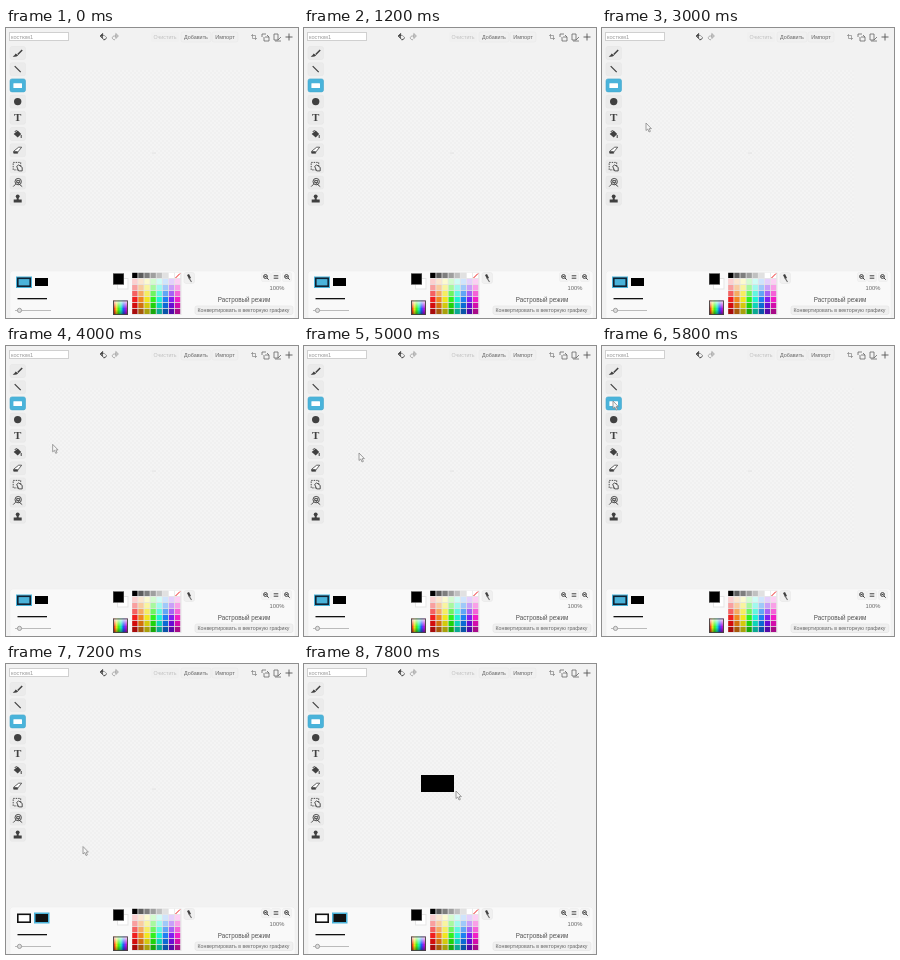
Recreate the animation shown at these times as an HTML page with a canvas. Size 292x290 px, loop 8000 ms.

```html
<!DOCTYPE html>
<html lang="ru">
<head>
<meta charset="utf-8">
<style>
html, body { margin: 0; width: 100%; height: 100%; overflow: hidden; background: #f2f2f2; }
canvas { display: block; width: 292px; height: 290px; }
</style>
</head>
<body>
<canvas width="292" height="290"></canvas>
<script>
const canvas = document.querySelector('canvas');
const g = canvas.getContext('2d');
const LOOP = 8000, STEP = 200;
const INK = '#404040', TEXT = '#666', BLUE = '#4ab3da';

// Pointer path: time, x, y
const POINTER = [
  [2600, 24, 87], [3000, 44, 95], [3600, 44, 95], [4200, 48, 100],
  [4600, 48, 100], [5000, 55, 107], [5600, 11, 55], [6000, 11, 55],
  [6600, 37, 254], [7000, 37, 254], [7400, 117, 111], [7800, 152, 127]
];
const DRAW_START = 7400, PICK = 6800;
const ORIGIN = [117, 111];

function box(x, y, w, h, fill, stroke, width = 1) {
  if (fill) { g.fillStyle = fill; g.fillRect(x, y, w, h); }
  if (stroke) {
    g.strokeStyle = stroke;
    g.lineWidth = width;
    g.strokeRect(x + width / 2, y + width / 2, w - width, h - width);
  }
}

function round(x, y, w, h, r, fill, stroke) {
  g.beginPath();
  g.roundRect(x, y, w, h, r);
  g.fillStyle = fill;
  g.fill();
  if (stroke) { g.strokeStyle = stroke; g.lineWidth = 0.6; g.stroke(); }
}

function shape(x, y, d, fill, stroke, width = 1) {
  const p = new Path2D(d);
  g.save();
  g.translate(x, y);
  if (fill) { g.fillStyle = fill; g.fill(p); }
  if (stroke) { g.strokeStyle = stroke; g.lineWidth = width; g.stroke(p); }
  g.restore();
}

function disc(x, y, r, fill, stroke, width = 1) {
  g.beginPath();
  g.arc(x, y, r, 0, Math.PI * 2);
  if (fill) { g.fillStyle = fill; g.fill(); }
  if (stroke) { g.strokeStyle = stroke; g.lineWidth = width; g.stroke(); }
}

function label(s, x, y, size, color, align = 'center') {
  g.font = size + 'px "Liberation Sans", Arial, sans-serif';
  g.textAlign = align;
  g.fillStyle = color;
  g.fillText(s, x, y);
}

function checker() {
  const tile = document.createElement('canvas');
  tile.width = tile.height = 4;
  const c = tile.getContext('2d');
  c.fillStyle = '#f4f4f4';
  c.fillRect(0, 0, 4, 4);
  c.fillStyle = '#f0f0f0';
  c.fillRect(0, 0, 2, 2);
  c.fillRect(2, 2, 2, 2);
  return g.createPattern(tile, 'repeat');
}
const grid = checker();

function topBar() {
  box(3, 4, 60, 9, '#fff', '#d0d0d0');
  label('костюм1', 5, 10.8, 5.6, '#999', 'left');
  const arrow = 'M-2.5 -1H0.5C3.5 -1 3.5 2.8 0 2.8M-0.8 -3.5L-3.4 -1L-0.8 1.5Z';
  shape(97.5, 9, arrow, '#444', '#444', 0.9);
  shape(97.8, 9, 'M-1 -1H0.5C3 -1 3 2.2 -0.5 2.2Z', '#f2f2f2');
  g.save();
  g.translate(109, 9);
  g.scale(-1, 1);
  shape(0, 0, arrow, null, '#999', 0.8);
  g.restore();

  round(145, 4, 28, 10, 2, '#f0f0f0');
  round(175, 4, 30, 10, 2, '#f0f0f0', '#e8e8e8');
  round(206, 4, 26, 10, 2, '#f0f0f0', '#e8e8e8');
  label('Очистить', 159, 10.8, 5.3, '#c0c0c0');
  label('Добавить', 190, 10.8, 5.4, TEXT);
  label('Импорт', 219, 10.8, 5.6, TEXT);

  shape(248, 9, 'M-1.5 -3V1.5H3M-3 -1.5H1.5V3', null, '#888', 0.7);
  shape(260, 9, 'M-4 0V-3H0M-1 0H3V4H-2V0M1 -2L3 0', null, '#666', 0.8);
  shape(271, 9, 'M-3 -3H1V3H-3ZM-2 4H4M1 3L4 0', null, '#666', 0.8);
  shape(283, 9, 'M-3.5 0H3.5M0 -3.5V3.5', null, '#555', 0.9);
}

const TOOLS = [
  (x, y) => {
    shape(x, y, 'M4.5 -3L0 1.5', null, INK, 1.5);
    shape(x, y, 'M-5 3.5Q-3 2.5 -2 0.5L0.5 2.5Q-2 4.5 -5 3.5Z', INK);
  },
  (x, y) => shape(x, y, 'M-3 -3L3 3', null, INK, 1.2),
  (x, y) => round(x - 4.3, y - 2.2, 8.6, 4.8, 0.5, '#fff'),
  (x, y) => disc(x, y, 3.7, INK),
  (x, y) => {
    g.font = 'bold 11px "Liberation Serif", serif';
    g.textAlign = 'center';
    g.fillStyle = INK;
    g.fillText('T', x, y + 3.6);
  },
  (x, y) => {
    shape(x, y, 'M-4 0L0 -3.5L3.5 0L0 3.5Z', INK);
    shape(x, y, 'M-1 -4L-3 -2M3.5 1V4', null, INK, 1);
  },
  (x, y) => {
    shape(x, y, 'M-4 1L1 -3H4L0 2V3H-4Z', '#fff', INK, 0.8);
    shape(x, y, 'M-4 1H0V3H-4Z', INK);
  },
  (x, y) => {
    g.setLineDash([1.5, 1]);
    shape(x, y, 'M-4.5 -4H3V3.5H-4.5Z', null, INK, 0.9);
    g.setLineDash([]);
    shape(x, y, 'M-1 0L1 -1.5L4.5 1V4.5H1Z', '#eee', INK, 0.9);
  },
  (x, y) => {
    disc(x + 0.5, y - 1, 3.2, '#e4e4e4', INK, 0.9);
    shape(x, y, 'M-4.5 4L-2 1.5M0 0.5L4.5 4M-1 -2H2V0H-1Z', null, INK, 0.9);
  },
  (x, y) => {
    disc(x, y - 2.5, 1.9, INK);
    shape(x, y, 'M-1 -2H1V0.8H4V3.8H-4V0.8H-1Z', INK);
  }
];

function toolBar() {
  TOOLS.forEach((icon, i) => {
    const y = 25 + i * 16.2;
    const on = i === 2;
    round(4, y - 6.5, 15.5, 13, 2, on ? BLUE : '#ebebeb', on ? '#43a6cc' : '#e6e6e6');
    icon(11.7, y);
  });
}

function fillModes(solid) {
  if (solid) {
    box(11, 249.5, 14, 9.5, '#fff', '#111', 1.6);
    box(28, 248.5, 15.5, 11, BLUE);
    box(29.5, 250, 12.5, 8, '#111');
  } else {
    box(10, 248.5, 16, 11.5, BLUE);
    box(11, 249.5, 14, 9.5, BLUE, '#123', 1.6);
    box(29, 250, 13, 8, '#000');
  }
  box(11.5, 270, 29.5, 1.3, '#111');
  box(9, 282, 36, 1, '#bbb');
  disc(13.5, 282.4, 2.1, '#ddd', '#999', 0.9);
}

function palette() {
  const hues = [0, 30, 57, 115, 172, 212, 268, 312];
  const lightness = [90, 80, 67, 53, 44, 35];
  const w = 6.1, h = 6;
  box(126, 244.5, 49.5, 42.5, '#e6e6e6');
  for (let c = 0; c < 8; c++) {
    const grey = c ? Math.min(255, 60 + c * 33) : 0;
    const x = 126.2 + c * w;
    box(x, 244.8, w - 0.8, h - 0.8, `rgb(${grey},${grey},${grey})`);
    lightness.forEach((l, r) =>
      box(x, 244.8 + (r + 1) * h, w - 0.8, h - 0.8, `hsl(${hues[c]},88%,${l}%)`));
  }
  shape(169, 245, 'M0.5 5L5 0.5', null, '#e22', 1);
}

function colors() {
  box(111, 250, 11.5, 11.5, '#fff', '#e4e4e4');
  box(107, 245.5, 11, 11, '#000', '#777', 0.5);

  const hue = g.createLinearGradient(108, 0, 122, 0);
  for (let i = 0; i <= 6; i++) hue.addColorStop(i / 6, `hsl(${i * 55},90%,52%)`);
  const shade = g.createLinearGradient(0, 273, 0, 287);
  shade.addColorStop(0, 'rgba(255,255,255,.85)');
  shade.addColorStop(0.5, 'rgba(255,255,255,.1)');
  shade.addColorStop(0.6, 'rgba(0,0,0,0)');
  shade.addColorStop(1, 'rgba(0,0,0,.45)');
  box(107, 272.5, 15, 14.5, hue);
  box(107, 272.5, 15, 14.5, shade, '#444', 0.9);

  palette();
  round(178, 244.5, 10.5, 11, 2, '#f0f0f0', '#e8e8e8');
  shape(183, 250, 'M-2 -3L0 -4L2 0L0 1Z', INK);
  shape(183, 250, 'M0 0L2.5 4', null, '#666', 1.1);
}

function zoom() {
  for (const x of [260, 270, 281]) round(x - 4.5, 244.5, 9, 9, 1.5, '#f3f3f3', '#ececec');
  for (const x of [259.5, 280.5]) {
    disc(x, 248.5, 1.9, '#eee', INK, 1);
    shape(x, 248.5, 'M1.5 1.5L3.2 3.2M-1 0H1', null, INK, 1);
  }
  shape(270, 249, 'M-2.3 -1.2H2.3M-2.3 1.2H2.3', null, INK, 1);
  label('100%', 271, 261.5, 5.8, TEXT);
  label('Растровый режим', 238, 273.8, 6.3, '#555');
  round(189, 278, 98, 8.5, 2, '#f0f0f0', '#e2e2e2');
  label('Конвертировать в векторную графику', 237.5, 284, 5.25, TEXT);
}

function pointerAt(t) {
  if (t < POINTER[0][0]) return null;
  const i = POINTER.findIndex(k => k[0] > t);
  if (i < 0) return POINTER[POINTER.length - 1].slice(1);
  const [t0, x0, y0] = POINTER[i - 1], [t1, x1, y1] = POINTER[i];
  const k = (t - t0) / (t1 - t0);
  return [x0 + (x1 - x0) * k, y0 + (y1 - y0) * k];
}

function tooltip() {
  box(22, 54, 82, 10, '#dcdcd6');
  box(21, 53, 81.5, 9.5, '#f1f0d8', '#b4b39f', 0.8);
  label('Прямоугольник (Shift: Квадрат)', 23, 59.6, 5.3, '#77766a', 'left');
}

function render(t) {
  box(0, 0, 292, 290, '#f2f2f2');
  box(43, 42, 209, 155, grid);
  shape(148, 125, 'M-2 0H2', null, '#e2e2e2', 1);
  topBar();
  toolBar();
  round(4, 243, 285, 50, 3, '#f9f9f9', '#efefef');
  fillModes(t >= PICK);
  colors();
  zoom();

  const p = pointerAt(t);
  if (t >= DRAW_START) {
    const [x, y] = ORIGIN;
    box(x, y, Math.max(0, p[0] - 2 - x), Math.max(0, p[1] + 1 - y), '#000');
  }
  if (t >= 6200 && t < 7000) tooltip();
  if (p) shape(p[0], p[1], 'M0 0V7.5L1.8 6L3 9L4.4 8.4L3.2 5.6H5.4Z', '#f6f6f6', '#888', 0.8);
}

const start = performance.now();
function tick() {
  const t = (performance.now() - start) % LOOP;
  render(Math.floor(t / STEP) * STEP);
  requestAnimationFrame(tick);
}
tick();
</script>
</body>
</html>
```
